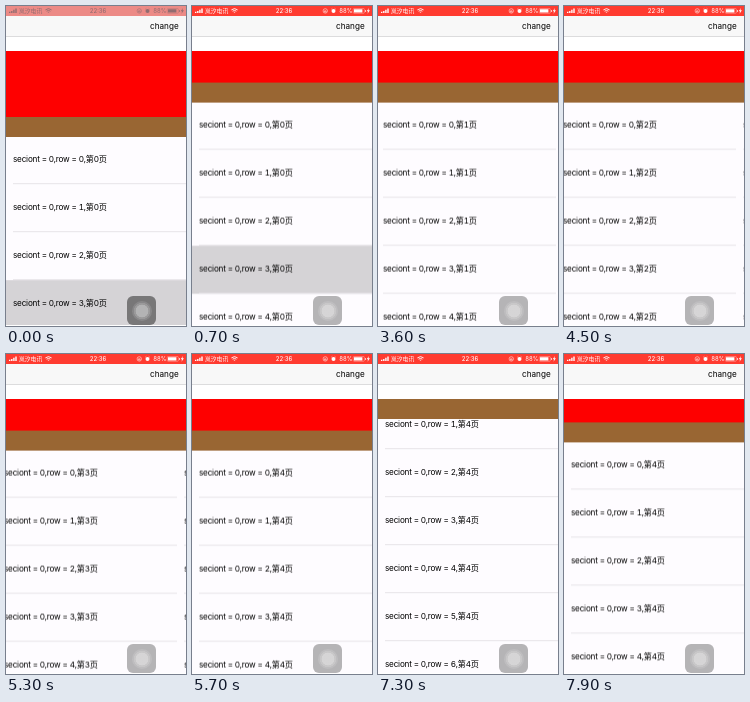
An HTML page that plays this animation: 180 px wide and 320 px high, repeating every 8000 ms.

```html
<!DOCTYPE html>
<html lang="en">
<head>
<meta charset="utf-8">
<title>Paged list</title>
<style>
  html, body { margin: 0; width: 100%; height: 100%; overflow: hidden; background: #fff; }
  body { font: 8.16px/47px Inter, "Noto Sans CJK SC", "Noto Sans CJK", sans-serif; letter-spacing: -.2px;
    font-variant-numeric: tabular-nums; color: #000; }
  #stage { position: relative; width: 180px; height: 320px; overflow: hidden; background: #fff; }
  #stage > * { position: absolute; left: 0; }
  #cover { top: 45px; width: 180px; height: 66px; background: #fe0000; }
  #list { top: 0; width: 180px; }
  #pages { display: flex; width: 900px; background: #fefcff; }
  .page { width: 180px; }
  .row { position: relative; height: 48px; padding-left: 7px; white-space: pre; }
  .row::after { content: ""; position: absolute; left: 7px; right: 0; bottom: 0; height: 1px; background: #e6e4e8; }
  .selected { background: #d5d3d6; }
  #band { top: 0; width: 180px; height: 20px; background: #996633; }
  #nav { top: 0; width: 180px; height: 45px; background: linear-gradient(#f8f8f8 30px, #dcdcdd 30px 31px, #fff 31px); }
  #nav span { position: absolute; right: 7.3px; top: 11px; line-height: 19px; letter-spacing: 0; }
  #status { top: 0; color: #fff; background: #ff3b30; }
  #status text { font-size: 5.8px; letter-spacing: 0; fill: currentColor; }
  #touch { left: 121px; top: 290px; width: 29px; height: 29px; border-radius: 6px; }
  #touch::before { content: ""; position: absolute; inset: 4.5px; border-radius: 50%;
    background: radial-gradient(circle, #ffffff70 0 6.2px, #ffffff40 6.6px 8px, #ffffff20 8.4px); }
  #foot { top: 319px; width: 180px; height: 1px; background: #fff; }
</style>
</head>
<body>
<div id="stage">
  <div id="cover"></div>
  <div id="list"><div id="pages"></div></div>
  <div id="band"></div>
  <div id="nav"><span>change</span></div>
  <svg id="status" width="180" height="10" viewBox="0 .4 180 10" fill="none" stroke="currentColor" stroke-width=".5">
    <g fill="currentColor" stroke="none">
      <path d="M3 7.5V6.2h1.4v1.3zM5.1 7.5V5.3h1.4v2.2zM7.2 7.5V4.2h1.4v3.3zM9.3 7.5V3h1.4v4.5z"/>
      <text x="13" y="7.3">岚汐电讯</text>
      <text x="92" y="7.3" text-anchor="middle" font-weight="500">22:36</text>
      <text x="147.3" y="7.3">88%</text>
      <path d="M162 3.7h8.4v3.2H162zM173.1 4.3h.7v2h-.7zM177 2.4l-2.3 3.3h1.4l-.6 2.5 2.4-3.5h-1.5z"/>
      <circle cx="141.5" cy="5.5" r="2"/>
    </g>
    <path d="M39.4 4.3q3.1-2.6 6.2 0M40.6 5.6q1.9-1.6 3.8 0M41.9 6.9q.6-.5 1.2 0" stroke-width=".9"/>
    <circle cx="133.3" cy="5.3" r="2.2"/><path d="M132.5 5.2h1.6v1.1h-1.6z"/>
    <path d="M139.3 3.6l1-.9M143.7 3.6l-1-.9"/>
    <rect x="161.2" y="2.9" width="11.2" height="4.8" rx="1" stroke-opacity=".6"/>
  </svg>
  <div id="touch"></div>
  <div id="foot"></div>
</div>
<script>
const LOOP = 8000, FRAME = 100, PAGE = 180, TOP = 45, BAND = 19.2;
const $ = id => document.getElementById(id);

for (let p = 0; p < 5; p++) {
  const page = document.createElement("div");
  page.className = "page";
  for (let r = 0; r < 9; r++) {
    const row = document.createElement("div");
    row.className = p === 0 && r === 3 ? "row selected" : "row";
    row.textContent = `seciont = 0,row = ${r},第${p}页`;
    page.append(row);
  }
  $("pages").append(page);
}

// Each run: start time, then one value per frame; the last value holds.
const scrollRuns = [
  [0, 111, 109, 103, 95, 87, 81, 78, 76.6],
  [6200, 66, 40, 8.5, -18, -34, -42, -45],
  [7200, -40, -20, 5, 28, 46, 58, 65, 68.4]
];
const swipeRuns = [
  [0, 0],
  [2500, 13, 72, 136, 169, 180],
  [3600, 182, 240, 310, 349, 360],
  [4500, 368, 430, 496, 529, 540],
  [5300, 549, 610, 676, 709, 4 * PAGE]
];
const fadeRuns = [[0, 1, .8, .5, .2, 0]];

function track(id, runs, style) {
  const frames = runs.flatMap(([start, ...values]) => values.map((v, i) =>
    ({ ...style(v), offset: (start + i * FRAME) / LOOP, easing: "step-end" })));
  frames.push({ ...frames.at(-1), offset: 1 });
  $(id).animate(frames, { duration: LOOP, iterations: Infinity });
}

const mix = (a, b, k) => `rgb(${a.map((v, i) => Math.round(v + (b[i] - v) * k))})`;
const moveY = y => ({ transform: `translateY(${y}px)` });

track("list", scrollRuns, v => moveY(v + BAND));
track("band", scrollRuns, v => moveY(Math.max(TOP, v)));
track("pages", swipeRuns, x => ({ transform: `translateX(${-x}px)` }));
track("status", fadeRuns, k => ({
  backgroundColor: mix([255, 59, 48], [236, 138, 134], k),
  color: mix([255, 255, 255], [145, 108, 112], k)
}));
track("touch", fadeRuns, k => ({ backgroundColor: `rgba(40,40,40,${.34 + .2 * k})` }));
</script>
</body>
</html>
```
